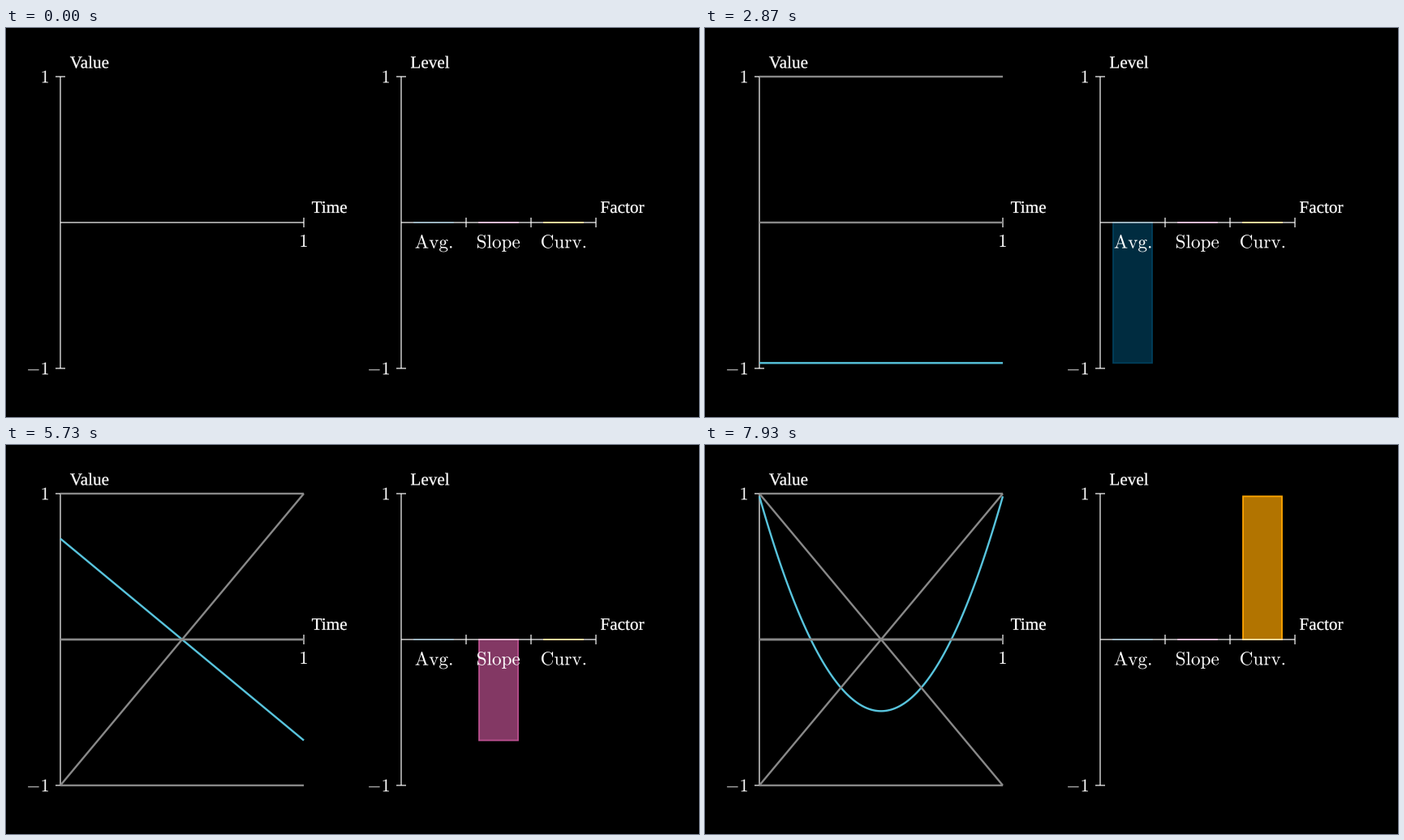
These frames come from a looping animation (854 px wide and 480 px high, 8 s). A matplotlib script:

```python
import numpy as np
import matplotlib.pyplot as plt
from matplotlib.animation import FuncAnimation
from matplotlib.patches import PathPatch, Rectangle
from matplotlib.textpath import TextPath
from matplotlib.transforms import Affine2D

plt.rcParams["mathtext.fontset"] = "cm"

W, H, DPI, FPS = 854, 480, 64, 15
PT = 72 / DPI               # points per pixel
MID, UNIT = 240, 180        # zero level and pixels per unit
LEFT, RIGHT, SPAN = 67, 487, 300
BLUE, GREY = "#58c4dd", "#888888"
BAR_COLORS = ["#003f5c", "#bc5090", "#ffa600"]
BAR_W, SLOT = 48, 80

# (average, slope, curvature) at each whole second
KEYS = np.array([
    (0, 0, 0), (0, 0, 0), (1, 0, 0), (-1, 0, 0), (0, 0, 0),
    (0, 1, 0), (0, -1, 0), (0, 0, 0), (0, 0, 1),
], float)

fig = plt.figure(figsize=(W / DPI, H / DPI), dpi=DPI, facecolor="black")
ax = fig.add_axes([0, 0, 1, 1])
ax.set(xlim=(0, W), ylim=(0, H))
ax.axis("off")


def line(xs, ys, width, color, z):
    art, = ax.plot(xs, ys, color=color, lw=width * PT, zorder=z,
                   solid_capstyle="butt", solid_joinstyle="round")
    art.set_snap(False)
    return art


def text(s, size, x, y, anchor, font=None, weight=0):
    """Place text by its ink: anchor is 'top', 'right' or 'base'."""
    path = TextPath((0, 0), s, size=size, prop=font)
    box = path.get_extents()
    cx, cy = (box.x0 + box.x1) / 2, (box.y0 + box.y1) / 2
    ox, oy = {"top": (cx, box.y1), "right": (box.x1, cy),
              "base": (box.x0, 0)}[anchor]
    path = Affine2D().translate(x - ox, y - oy).transform_path(path)
    art = PathPatch(path, fc="white", ec="white", lw=weight * PT, zorder=4)
    art.set_snap(False)
    ax.add_patch(art)


def title(s, x, y):
    text(s, 21.2, x, y, "base", {"family": "Liberation Serif"}, 0.25)


def axes(x0, length, ticks):
    line([x0, x0], [MID - UNIT, MID + UNIT], 1.2, "white", 3)
    line([x0, x0 + length], [MID, MID], 1.2, "white", 3)
    for x in ticks:
        line([x, x], [MID - 6, MID + 6], 1.2, "white", 3)
    for v in (1, -1):
        y = MID + v * UNIT
        line([x0 - 6, x0 + 6], [y, y], 1.2, "white", 3)
        text(f"${v}$", 22.4, x0 - 15, y, "right")


def smooth(t):
    sig = lambda v: 1 / (1 + np.exp(-v))
    err = sig(-5)
    return (sig(10 * (t - 0.5)) - err) / (1 - 2 * err)


U = np.linspace(-1, 1, 121)
CURVE_X = LEFT + SPAN * (U + 1) / 2


def curve_y(factors):
    a, s, c = factors
    return MID + UNIT * (a + s * U + c * (1.5 * U ** 2 - 0.5))


axes(LEFT, SPAN, [LEFT + SPAN])
axes(RIGHT, 3 * SLOT, [RIGHT + SLOT * i for i in (1, 2, 3)])
text("$1$", 22.4, LEFT + SPAN, MID - 15, "top")
title("Value", 79, H - 49.3)
title("Level", 499, H - 49.3)
title("Time", 377, H - 228)
title("Factor", 733, H - 228)

bars = []
for i, (name, color) in enumerate(zip(("Avg.", "Slope", "Curv."), BAR_COLORS)):
    x = RIGHT + SLOT * (i + 0.5)
    text(rf"$\mathrm{{{name}}}$", 23.2, x, MID - 15, "top")
    bar = Rectangle((x - BAR_W / 2, MID), BAR_W, 0, fc=color + "b3", ec=color,
                    lw=1.8 * PT, zorder=2)
    bar.set_snap(False)
    bars.append(ax.add_patch(bar))

curve = line([], [], 2.4, BLUE, 5)
traces = [line(CURVE_X, curve_y(k), 2.4, GREY, 6) for k in KEYS[1:-1]]


def update(n):
    sec, step = divmod(n, FPS)
    p = smooth(step / FPS)
    now = KEYS[sec] + (KEYS[sec + 1] - KEYS[sec]) * p
    if sec == 0:
        curve.set_data([LEFT, LEFT + SPAN * p], [MID, MID])
    else:
        curve.set_data(CURVE_X, curve_y(now))
    curve.set_visible(n > 0)
    for i, trace in enumerate(traces):
        trace.set_visible(sec > i)
    for bar, v in zip(bars, now):
        bar.set_y(MID + min(v, 0) * UNIT)
        bar.set_height(max(abs(v) * UNIT, 0.01))
    return [curve, *traces, *bars]


anim = FuncAnimation(fig, update, frames=8 * FPS, init_func=lambda: update(0),
                     interval=1000 / FPS, repeat=True, repeat_delay=0)
plt.show()
```
